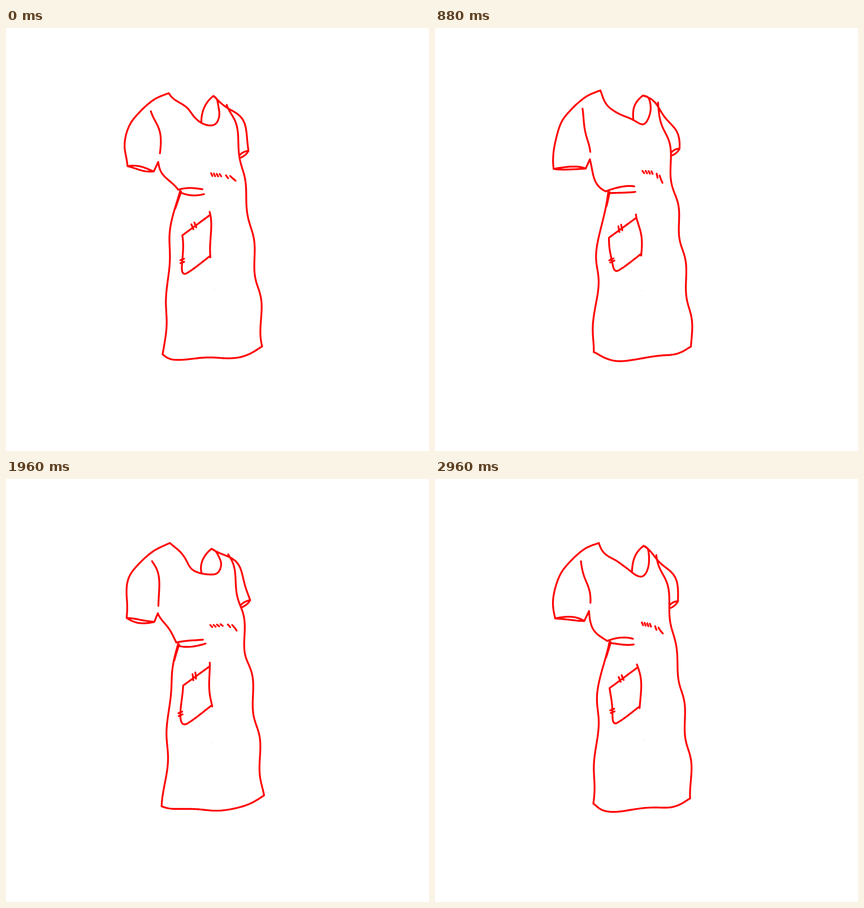
Recreate the animation shown at these times as an HTML page with a canvas. Size 748 by 748 pixels, loop 3000 ms.

```html
<!DOCTYPE html>
<html>
<head>
<meta charset="utf-8">
<style>
html, body { margin: 0; width: 100%; height: 100%; overflow: hidden; background: #fff; }
canvas { display: block; }
</style>
</head>
<body>
<canvas id="stage" width="748" height="748"></canvas>
<script>
const ctx = document.getElementById('stage').getContext('2d');
const LOOP = 3000, STEP = 40;
const PERIOD = 2500, WAVELENGTH = 117.8, AMPLITUDE = 2.85;

const strokes = [];

// Smooth Catmull-Rom curve through the points
function curve(...pts) {
  const at = i => pts[Math.max(0, Math.min(pts.length - 1, i))];
  const path = [];
  for (let i = 0; i < pts.length - 1; i++) {
    const [a, b, c, d] = [at(i - 1), at(i), at(i + 1), at(i + 2)];
    for (let t = 0; t < 1; t += 1 / 16) {
      path.push([0, 1].map(k => b[k] + t / 2 * (c[k] - a[k]
        + t * (2 * a[k] - 5 * b[k] + 4 * c[k] - d[k]
        + t * (3 * (b[k] - c[k]) + d[k] - a[k])))));
    }
  }
  strokes.push([...path, at(pts.length - 1)]);
}

// Line from a to b whose middle bows sideways; clockwise is positive
function bow([ax, ay], [bx, by], depth = 0) {
  const dx = bx - ax, dy = by - ay, len = Math.hypot(dx, dy);
  const path = [];
  for (let i = 0; i <= 16; i++) {
    const t = i / 16, side = 4 * t * (1 - t) * depth / len;
    path.push([ax + dx * t - dy * side, ay + dy * t + dx * side]);
  }
  strokes.push(path);
}

function dash(x, y, dx, dy) {
  bow([x, y], [x + dx, y + dy]);
}

const neck = [290.5, 112.3], collar = [366, 121];
const cuffL = [212, 247], cuffIn = [264, 251], armpit = [271, 235];
const cuffR = [431.5, 214.5], waist = [302, 288.5];
const hemL = [278, 576], hemR = [454, 562];

// Left sleeve
curve(neck, [264, 124.5], [238.5, 146.5], [220, 171], [212, 205], cuffL);
bow(cuffL, cuffIn, -2.5);
bow(cuffL, cuffIn, 3);
bow(cuffIn, armpit);
bow([259, 144.5], [272.3, 221.5], -3.2);

// Neckline and collar
curve(neck, [301, 127], [316, 142.5], [333, 158], [361, 169.5], [374, 166], [380, 148], [375, 127], collar);
bow([348, 165], collar, -7);

// Right sleeve
bow(collar, cuffR, -16);
bow(cuffR, [416, 222], 1.7);
bow(cuffR, [416, 227], -2);

// Dress sides, hem and belt
bow(armpit, waist, 4);
curve([393, 133], [405, 175], [416, 228], [422.5, 290], [431, 334], [436.5, 383], [449, 488], hemR);
curve(hemR, [418, 579], [340, 586], [300, 584], hemL);
curve([306, 290], [294, 346], [287.5, 400], [286, 470], [280, 545], hemL);
bow([308, 291], [300.5, 318]);
bow(waist, [350, 282.5], -2.3);
bow([308, 293], [353, 291], 2);

// Pocket with its stitches
const flap = [358.5, 333], fold = [364, 400], edge = [310.5, 368];
bow([358, 327], [364, 403], -1);
bow(flap, edge);
curve(edge, [311, 415], [316, 431.5], [330, 426], fold);
for (let i = 0; i < 2; i++) {
  dash(327 + 5 * i, 348 - 3 * i, 2, 10);
  dash(307 + i, 412 + 4.5 * i, 7, -3);
}

// Chest stitches
for (let i = 0; i < 4; i++) dash(364 + 5.5 * i, 255.5, 3, 4);
dash(391.5, 258, 3, 6);
dash(398, 260, 7, 11);

// Diagonal wave: travels down-right and shifts points across its path
function bend([x, y], time) {
  const turn = time / PERIOD - 0.485 - (x + y - 403) / WAVELENGTH;
  const shift = AMPLITUDE * Math.cos(2 * Math.PI * turn);
  return [x + shift, y - shift];
}

function draw(now) {
  const time = Math.floor(now % LOOP / STEP) * STEP;
  ctx.fillStyle = '#fff';
  ctx.fillRect(0, 0, 748, 748);
  ctx.strokeStyle = '#f00';
  ctx.lineWidth = 3.2;
  ctx.lineCap = ctx.lineJoin = 'round';
  ctx.beginPath();
  for (const path of strokes) {
    path.forEach((point, i) => ctx[i ? 'lineTo' : 'moveTo'](...bend(point, time)));
  }
  ctx.stroke();
  const [x, y] = bend([366, 465], time);
  ctx.fillStyle = '#fcc';
  ctx.fillRect(x - 0.5, y - 1, 1, 2);
}

const start = performance.now();
function tick() {
  draw(performance.now() - start);
  requestAnimationFrame(tick);
}
tick();
</script>
</body>
</html>
```
